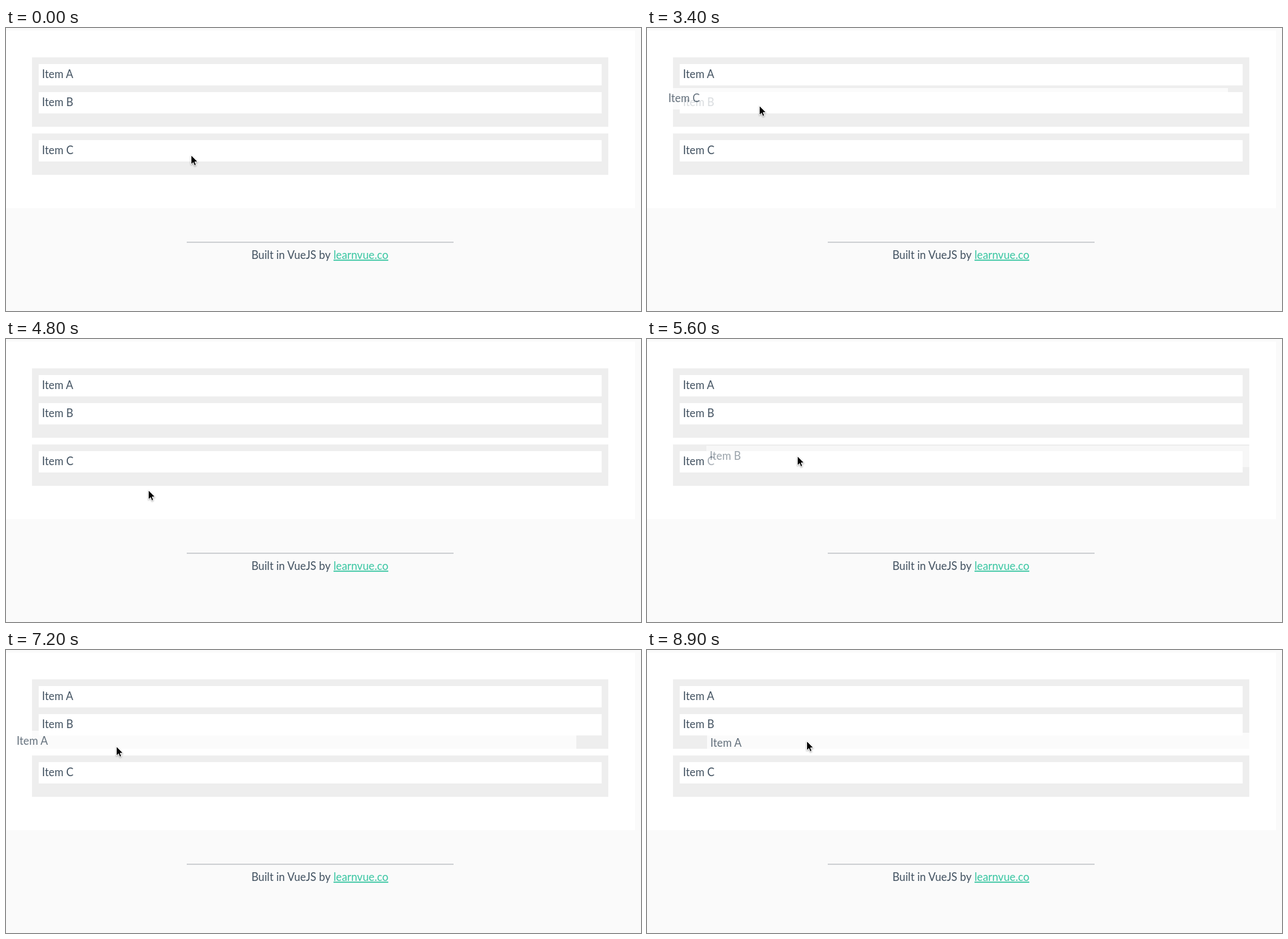
Write an HTML page that moves like this. It is 952 px wide and 424 px high and loops after 9 s.

```html
<!DOCTYPE html>
<html lang="en">
<head>
<meta charset="utf-8">
<title>Drag and drop lists</title>
<style>
  html, body { margin: 0; width: 100%; height: 100%; overflow: hidden; background: #fafafa; }
  svg { display: block; }
  text { font: 16.3px Lato, sans-serif; fill: #40505f; }
  .link { fill: #35c5a0; text-decoration: underline; }
  #cursor { filter: drop-shadow(0 1px 1px rgba(0, 0, 0, .35)); }
</style>
</head>
<body>
<svg width="952" height="424">
  <rect y="4" width="943" height="266" fill="#fff"/>
  <rect x="39" y="44" width="864" height="104" fill="#eee"/>
  <rect x="39" y="158" width="864" height="62" fill="#eee"/>
  <g id="items"></g>
  <rect x="271" y="320" width="400" height="2" fill="#d0d2d5"/>
  <text x="368" y="346">Built in VueJS by <tspan class="link" x="491">learnvue.co</tspan></text>
  <g id="ghost"></g>
  <path id="cursor" d="M.5.5v14l3.2-3 2 4.8 2.4-1-2-4.7h4.4z" fill="#000" stroke="#fff" stroke-width=".9"/>
</svg>
<script>
// Times are in seconds
const LOOP = 9, STEP = 0.1;
const REACH = 0.4, FADE = 0.3;
const GHOST_OPACITY = 0.8;
const ITEM_X = 49;
const itemY = { A: 54, B: 96, C: 168 };

const at = (time, x, y) => ({ time, x, y });
const drag = (item, grab, ...stops) => ({ item, grab, stops, drop: stops[stops.length - 1] });

// The pointer grabs an item, pulls it through the stops and lets go at the last one
const drags = [
  drag('C', at(2.7, 190, 194), at(3.5, 167, 112), at(4.2, 261, 214), at(4.5, 216, 239)),
  drag('B', at(5.2, 189, 118), at(5.5, 229, 182)),
  drag('B', at(6, 189, 118), at(6.2, 234, 172)),
  drag('A', at(6.8, 203, 77), at(7.2, 165, 144), at(7.4, 172, 178)),
  drag('A', at(7.8, 212, 61), at(8.1, 216, 177)),
  drag('A', at(8.5, 198, 66), at(8.9, 239, 136))
];

// Between drags the pointer rests, then reaches for the next item
const path = [at(0, 277, 190), at(1.3, 277, 190), at(1.6, 275, 190)];
for (const { grab, stops } of drags) {
  const rest = path[path.length - 1];
  const leave = Math.max(rest.time, grab.time - REACH - STEP);
  path.push(at(leave, rest.x, rest.y), grab, ...stops);
}

const smooth = k => k * k * (3 - 2 * k);

function pointerAt(time) {
  const next = path.findIndex(p => p.time > time);
  if (next < 0) return path[path.length - 1];
  const a = path[next - 1], b = path[next];
  const k = smooth((time - a.time) / (b.time - a.time));
  return at(time, Math.round(a.x + (b.x - a.x) * k), Math.round(a.y + (b.y - a.y) * k));
}

const card = (item, x, y) =>
  `<g transform="translate(${x} ${y})"><rect width="844" height="32" fill="#fff"/><text x="5" y="21">Item ${item}</text></g>`;

const [items, ghost, cursor] = ['items', 'ghost', 'cursor'].map(id => document.getElementById(id));
items.innerHTML = Object.keys(itemY).map(item => card(item, ITEM_X, itemY[item])).join('');

function draw(time) {
  const { x, y } = pointerAt(time);
  cursor.setAttribute('transform', `translate(${x} ${y})`);

  const active = drags.find(d => time > d.grab.time && time < d.drop.time + FADE);
  ghost.innerHTML = '';
  if (!active) return;
  const { item, grab, drop } = active;
  const held = pointerAt(Math.min(time, drop.time));
  const fade = Math.max(0, time - drop.time) / FADE;
  ghost.setAttribute('opacity', GHOST_OPACITY * (1 - fade));
  ghost.innerHTML = card(item, ITEM_X + held.x - grab.x, itemY[item] + held.y - grab.y);
}

function frame() {
  const step = Math.floor(performance.now() / 1000 / STEP);
  draw(step % Math.round(LOOP / STEP) / 10);
  requestAnimationFrame(frame);
}
frame();
</script>
</body>
</html>
```
